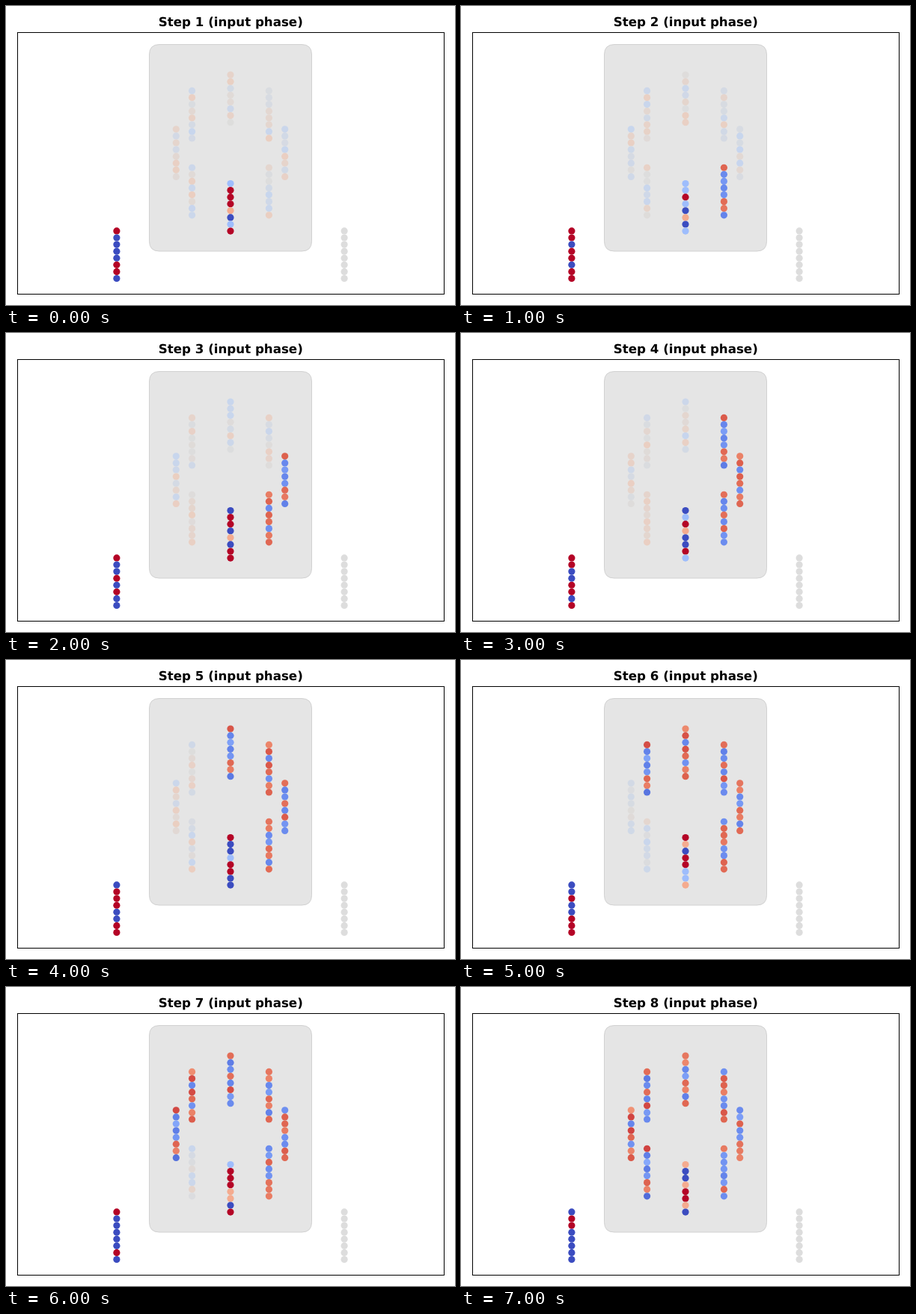
An HTML page for the animation above (8 s loop, 600x400 px).

```html
<!DOCTYPE html>
<html lang="en">
<head>
<meta charset="utf-8">
<title>Ring memory, input phase</title>
<style>
  html, body { margin: 0; width: 100%; height: 100%; overflow: hidden; background: #fff; }
  svg { display: block; width: 600px; height: 400px; }
  text { font: bold 16.67px "DejaVu Sans", sans-serif; text-anchor: middle; text-rendering: geometricPrecision; }
</style>
</head>
<body>
<svg viewBox="0 0 600 400" xmlns="http://www.w3.org/2000/svg">
  <rect width="600" height="400" fill="#fff"/>
  <path d="M205 51.5H395Q408.5 51.5 408.5 65V314.5Q408.5 328 395 328H205Q191.5 328 191.5 314.5V65Q191.5 51.5 205 51.5Z"
        fill="#e5e5e5" stroke="#d1d1d1"/>
  <g id="dots"></g>
  <rect x="15.5" y="35.5" width="570" height="350" fill="none" stroke="#000"/>
  <text id="title" x="300.3" y="27"></text>
</svg>
<script>
const STEP_MS = 1000, SIZE = 8, SLOTS = 8, GAP = 9.08;
const CENTER = { x: 300, y: 196.6 }, RADIUS = 72.7;

// The byte read at each step, top dot first, 1 = red.
const inputs = [0x86, 0xdb, 0x94, 0xcd, 0x73, 0x27, 0x82, 0x60];

// Each controller dot opposes one input bit and weakly follows another.
const wiring = [[0, 6], [1, 0], [2, 0], [3, 6], [4, 2], [5, 2], [6, 5], [1, 0]];

// Diverging scale from blue through grey to red.
const scale = [
  [59, 76, 192], [98, 130, 234], [141, 176, 254], [184, 208, 249], [221, 221, 221],
  [244, 196, 173], [244, 154, 123], [221, 96, 77], [180, 4, 38]
];

function color(v) {
  const p = (v + 1) * 4;
  const i = Math.min(7, Math.floor(p));
  const mix = scale[i].map((a, c) => Math.round(a + (scale[i + 1][c] - a) * (p - i)));
  return `rgb(${mix})`;
}

// Seeded noise from -1 to 1.
function noise(a, b, c) {
  const n = Math.sin(a * 12.9898 + b * 78.233 + c * 37.719) * 43758.5453;
  return 2 * (n - Math.floor(n)) - 1;
}

// Bit i of the byte read at a step, as 1 or -1.
const bit = (step, i) => (inputs[step - 1] >> (SIZE - 1 - i)) & 1 ? 1 : -1;

function coreValue(step, i) {
  const [against, along] = wiring[i];
  return 0.3 * bit(step, along) - 0.7 * bit(step, against);
}

// Bytes move one slot per step and their noise grows; empty slots stay faint.
function slotValue(step, k, i) {
  const read = step - k;
  if (read < 1) return 0.15 * noise(step, k, i);
  return bit(read, i) * (0.68 + (0.04 + 0.02 * k) * noise(read, 0, i));
}

const dots = document.getElementById("dots");
const title = document.getElementById("title");

function column(x, y, value) {
  const cells = Array.from({ length: SIZE }, (_, i) => {
    const c = document.createElementNS("http://www.w3.org/2000/svg", "circle");
    c.setAttribute("cx", x);
    c.setAttribute("cy", y + (i - (SIZE - 1) / 2) * GAP);
    c.setAttribute("r", 4.6);
    return dots.appendChild(c);
  });
  return { cells, value };
}

const columns = [column(147.9, 332.7, bit), column(452.1, 332.7, () => 0)];
for (let k = 0; k < SLOTS; k++) {
  const a = k * 2 * Math.PI / SLOTS;
  columns.push(column(
    CENTER.x + RADIUS * Math.sin(a),
    CENTER.y + RADIUS * Math.cos(a),
    k ? (step, i) => slotValue(step, k, i) : coreValue
  ));
}

let shown = 0;
function draw(step) {
  if (step === shown) return;
  shown = step;
  title.textContent = `Step ${step} (input phase)`;
  for (const { cells, value } of columns)
    cells.forEach((c, i) => c.setAttribute("fill", color(value(step, i))));
}

const start = performance.now();
function tick() {
  draw(Math.floor((performance.now() - start) / STEP_MS) % inputs.length + 1);
  requestAnimationFrame(tick);
}
tick();
</script>
</body>
</html>
```
